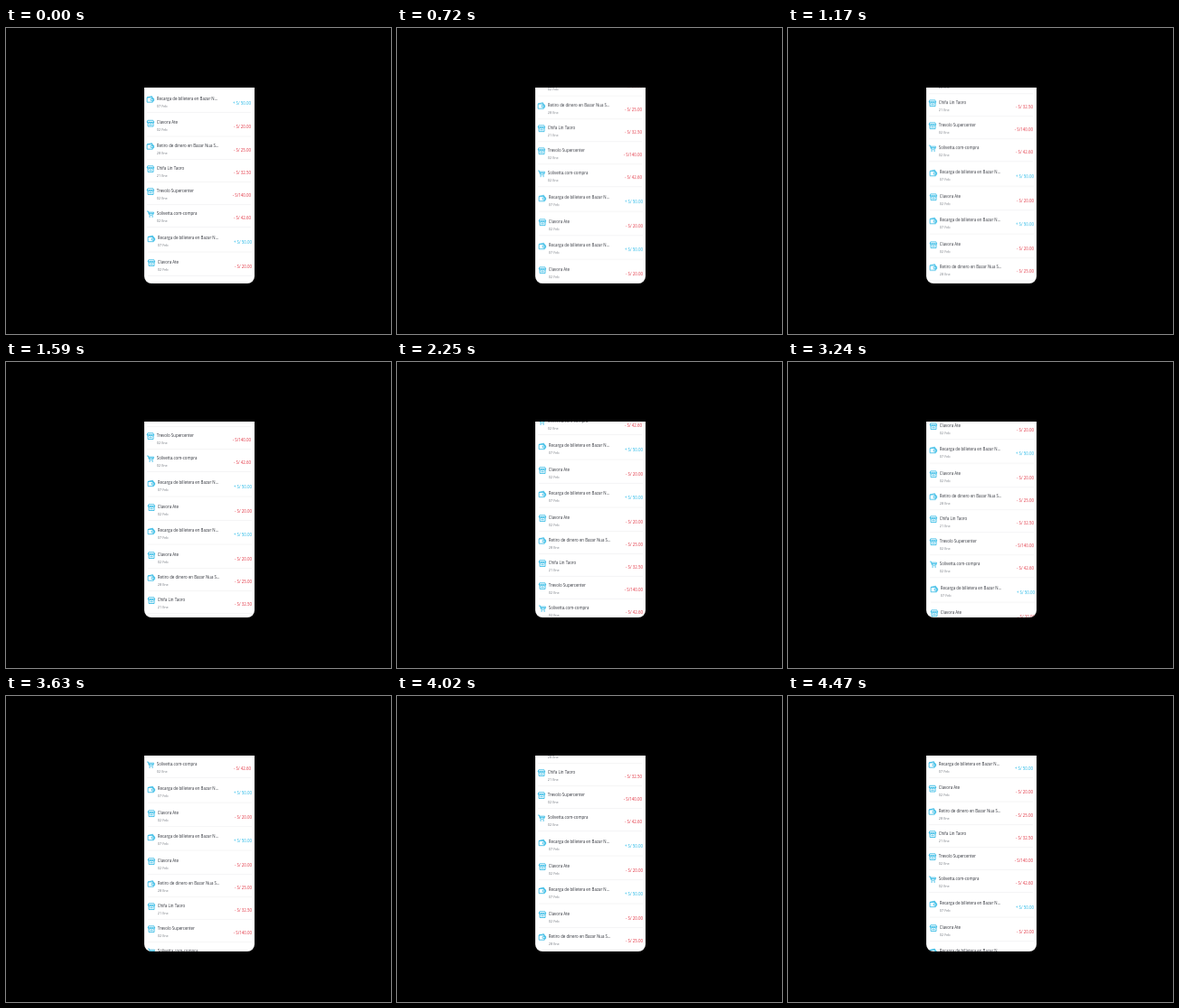
Recreate the animation shown at these times as an HTML page. Size 426 by 339 pixels, loop 4500 ms.

```html
<!DOCTYPE html>
<html lang="es">
<head>
<meta charset="utf-8">
<title>Movimientos</title>
<style>
  html, body { margin: 0; width: 100%; height: 100%; overflow: hidden; background: #000; }
  svg { display: block; width: 426px; height: 339px; }
  text { font: 500 4.4px "Open Sans", "Noto Sans", sans-serif; fill: #2d3038; }
  .date { font-size: 3.8px; font-weight: 400; fill: #70757d; }
  .amount { text-anchor: end; fill: #e02d3c; }
  .in { fill: #18b4e6; }
  .icon { fill: none; stroke: #25b5e4; stroke-width: .8; stroke-linejoin: round; stroke-linecap: round; }
  .rule { stroke: #ececee; stroke-width: .6; }
  #list { animation: scroll 4.5s -4ms infinite; }
  /* slow scroll down, quick return, one step every 30 ms */
  @keyframes scroll {
    0% { transform: translateY(0); animation-timing-function: steps(106); }
    70.6667% { transform: translateY(-198px); animation-timing-function: steps(44); }
    100% { transform: translateY(1.5px); }
  }
</style>
</head>
<body>
<svg viewBox="0 0 426 339">
  <defs>
    <clipPath id="card">
      <path d="M153 66H275V275a8 8 0 0 1-8 8H161a8 8 0 0 1-8-8Z"/>
    </clipPath>
    <g id="wallet" class="icon">
      <path d="M.5 1.6H6.3V6.9H.5ZM.5 1.6 5.4.4V1.6M6.3 3H7.6V5.4H5.2a1.2 1.2 0 0 1 0-2.4H6.3"/>
    </g>
    <g id="shop" class="icon">
      <path d="M1.2.5H6.8L7.6 2.5H.4ZM.4 2.5a1.2 1.2 0 0 0 2.4 0a1.2 1.2 0 0 0 2.4 0a1.2 1.2 0 0 0 2.4 0M1 3.9V7.2H7V3.9M2.7 5.4H5.3"/>
    </g>
    <g id="cart" class="icon">
      <path d="M.3.8H1.5L2.6 4.9H6.5L7.5 1.9H1.9M2.1 3.3H6.9"/>
      <path d="M3 6.7h.1M6 6.7h.1" stroke-width="1.3"/>
    </g>
  </defs>
  <g clip-path="url(#card)">
    <rect x="153" y="66" width="122" height="217" fill="#fff"/>
    <g id="list"></g>
  </g>
</svg>
<script>
  const topUp = ["wallet", "Recarga de billetera en Bazar N...", "07 Feb", "+ S/ 50.00"];
  const store = ["shop", "Clavora Ate", "02 Feb", "- S/ 20.00"];
  const cash = ["wallet", "Retiro de dinero en Bazar Nua S...", "28 Ene", "- S/ 25.00"];
  const food = ["shop", "Chifa Lin Taoro", "21 Ene", "- S/ 32.50"];
  const market = ["shop", "Trevolo Supercenter", "02 Ene", "- S/140.00"];
  const online = ["cart", "Solivetta.com-compra", "02 Ene", "- S/ 42.60"];

  // Each block sits one pixel further right; entries are [item, y centre of the title]
  const blocks = [
    [[topUp, 78], [store, 104.5], [cash, 130], [food, 155], [market, 180], [online, 205]],
    [[topUp, 232.5], [store, 259], [topUp, 285.5], [store, 312],
     [cash, 337], [food, 362], [market, 387], [online, 412]],
    [[topUp, 439.5], [store, 466]]
  ];

  const row = ([icon, title, date, amount], x, y) => `
    <g transform="translate(${x} ${y})">
      <use href="#${icon}" x="156" y="-2.7"/>
      <text x="166.8" y="1.6">${title}</text>
      <text class="date" x="166.8" y="9.8">${date}</text>
      <text class="amount ${amount[0] === "+" ? "in" : ""}" x="271" y="6.8">${amount}</text>
      <path class="rule" d="M156 15.6H271"/>
    </g>`;

  document.getElementById("list").innerHTML =
    blocks.map((rows, i) => rows.map(([item, y]) => row(item, i, y)).join("")).join("");
</script>
</body>
</html>
```
